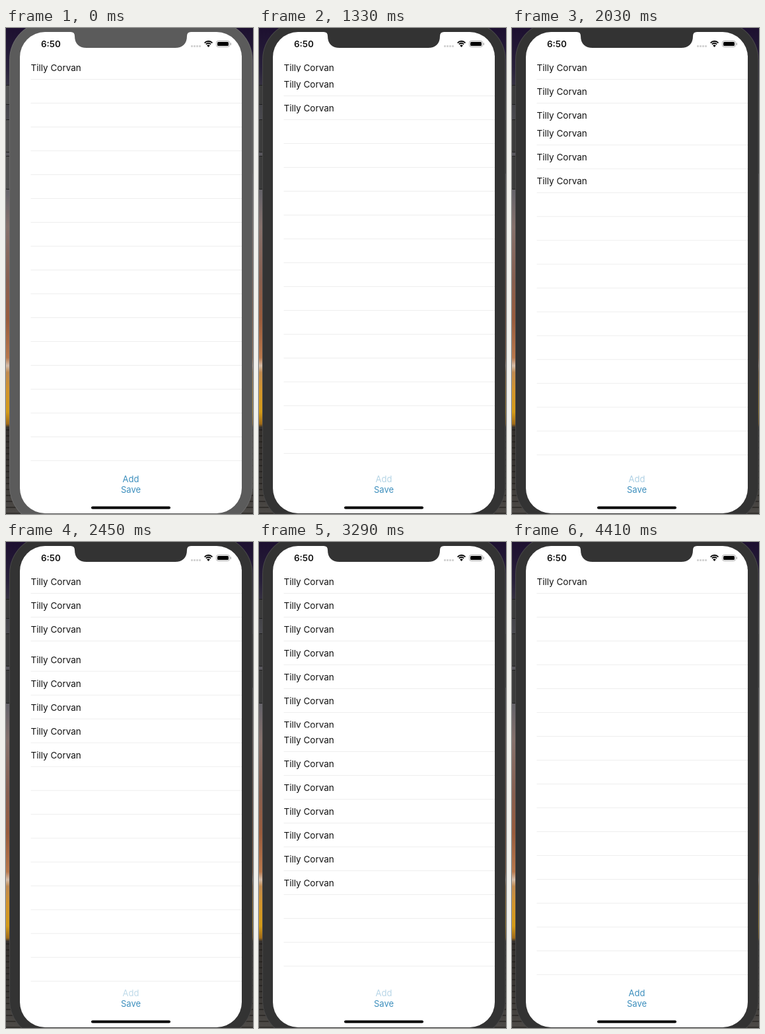
Animation of 374 by 734 pixels, one loop 4.62 s. Source, as an HTML page with a canvas:

```html
<!DOCTYPE html>
<html lang="en">
<head>
<meta charset="utf-8">
<title>List insert animation</title>
<style>
  html, body { margin: 0; width: 100%; height: 100%; overflow: hidden; background: #222; }
  canvas { display: block; width: 374px; height: 734px; }
</style>
</head>
<body>
<canvas id="stage" width="374" height="734"></canvas>
<script>
const ctx = document.getElementById('stage').getContext('2d');
const W = 374, H = 734;
const LOOP = 4620, STEP = 70;
const ROW = 36, TOP = 41.5, LEFT = 37.5, RIGHT = 357, LIST_END = 664;
const NAME = 'Tilly Corvan';
const FONT = 'Inter, Roboto, sans-serif';

// Moments at which a row is inserted
const TAPS = [910, 1229, 1460, 1690, 1921, 2079, 2237, 2395, 2553, 2711, 2872, 3034, 3195, 3356];
const INSERT = 160;
const FOCUS = 560;
const SAVE_DOWN = 3990, SAVE_UP = 4130, REMOVE = 220;

const clamp = v => Math.min(1, Math.max(0, v));
const ease = v => { v = clamp(v); return v * v * (3 - 2 * v); };

function text(str, x, y, size, color, weight = 400, align = 'left') {
  ctx.font = `${weight} ${size}px ${FONT}`;
  ctx.textAlign = align;
  ctx.fillStyle = color;
  ctx.fillText(str, x, y);
}

function box(x, y, w, h, color, r = 0) {
  ctx.fillStyle = color;
  ctx.beginPath();
  ctx.roundRect(x, y, w, h, r);
  ctx.fill();
}

function gradient(stops) {
  const g = ctx.createLinearGradient(0, 0, 0, H);
  for (const [y, color] of stops) g.addColorStop(y / H, color);
  return g;
}

const SKY = gradient([
  [0, '#1d1030'], [60, '#28203a'], [115, '#444449'], [250, '#67646a'], [300, '#85716c'],
  [380, '#875f50'], [440, '#995c3d'], [498, '#b8784c'], [510, '#d5bda8'], [520, '#c08a50'],
  [546, '#d2952d'], [580, '#d39b18'], [598, '#a06b18'], [603, '#34302d'], [680, '#3b3835'],
  [734, '#4d4a47']
]);

function backdrop() {
  box(0, 0, W, H, SKY);
  for (let y = 606; y < H; y += 9) box(0, y, W, 2, 'rgba(20,18,16,.45)');
}

function phone(active) {
  const bezel = active ? '#333333' : '#5b5b5b';
  const key = active ? '#3c3c3c' : '#525252';
  for (const [y, h] of [[86, 30], [138, 50], [193, 51]]) {
    box(0, y, 7, h, '#202020', 1);
    box(0, y + 1, 6, h - 2, key, 1);
  }
  box(371, 139, 3, 81, key);
  box(5, -10, 368.5, 760, active ? '#484848' : '#6a6a6a', 58);
  box(6, -9, 366.5, 758, bezel, 57);
  box(21, 6, 336, 727, '#fff', 38);

  // Notch with flared shoulders
  ctx.fillStyle = bezel;
  ctx.beginPath();
  ctx.moveTo(98, 5);
  ctx.lineTo(98, 6);
  ctx.quadraticCurveTo(104, 6, 104, 12);
  ctx.bezierCurveTo(104, 24, 111, 30, 122, 30);
  ctx.lineTo(256, 30);
  ctx.bezierCurveTo(267, 30, 274, 24, 274, 12);
  ctx.quadraticCurveTo(274, 6, 280, 6);
  ctx.lineTo(280, 5);
  ctx.fill();
}

function statusBar() {
  text('6:50', 53, 29, 13.4, '#111', 600);
  for (let i = 0; i < 4; i++) box(280 + i * 4, 26, 3, 3, '#d2d2d2', 1);

  ctx.strokeStyle = '#000';
  ctx.lineWidth = 1.8;
  for (const r of [5, 8]) {
    ctx.beginPath();
    ctx.arc(306.5, 28, r, -Math.PI * 0.76, -Math.PI * 0.24);
    ctx.stroke();
  }
  ctx.fillStyle = '#000';
  ctx.beginPath();
  ctx.moveTo(306.5, 29);
  ctx.arc(306.5, 28.5, 3, -Math.PI * 0.77, -Math.PI * 0.23);
  ctx.fill();

  ctx.strokeStyle = '#aaa';
  ctx.lineWidth = 1;
  ctx.beginPath();
  ctx.roundRect(318.5, 19.5, 20, 9, 2.8);
  ctx.stroke();
  box(320, 21, 17, 6, '#000', 1.5);
  box(339.6, 22.3, 1.3, 3.6, '#aaa', 0.6);
}

// Opaque run of rows; the first `filled` ones carry a name
function rows(at, count, filled) {
  const y = TOP + at * ROW;
  box(LEFT - 4, y, RIGHT - LEFT + 4, count * ROW, '#fff');
  for (let i = 0; i < count; i++) {
    const top = y + i * ROW;
    box(LEFT, top + 35.5, RIGHT - LEFT, 1, '#eeeeee');
    if (i < filled) text(NAME, LEFT, top + 23.3, 13.5, '#111');
  }
}

function list(t) {
  ctx.save();
  ctx.beginPath();
  ctx.rect(21, TOP, 336, LIST_END - TOP);
  ctx.clip();
  const done = TAPS.filter(tap => tap <= t).length;
  if (t >= SAVE_UP) {
    // The middle row survives and slides to the top
    const total = TAPS.length + 1, keep = total >> 1;
    const p = ease((t - SAVE_UP) / REMOVE);
    rows(0, total, total);
    rows(total - (total - 1) * p, 18, 0);
    rows(keep * (1 - p), 1, 1);
  } else if (!done) {
    rows(0, 18, 1);
  } else {
    const index = (done - 1) >> 1;
    const p = ease((t - TAPS[done - 1]) / INSERT);
    rows(0, index + 1, index + 1);
    rows(index + p, 18, done - index);
  }
  ctx.restore();
}

function addAlpha(t) {
  const low = 0.33;
  let a = 1;
  for (const tap of TAPS) {
    const down = 1 - (1 - low) * clamp((t - tap + 80) / 70);
    const up = low + (1 - low) * clamp((t - tap - 85) / 185);
    a = Math.min(a, Math.max(down, up));
  }
  return a;
}

function saveAlpha(t) {
  const down = 1 - 0.65 * clamp((t - SAVE_DOWN + 10) / 150);
  const up = 0.35 + 0.65 * clamp((t - SAVE_UP - 40) / 220);
  return Math.max(down, up);
}

function button(label, y, alpha) {
  ctx.globalAlpha = alpha;
  text(label, 189, y, 13, '#3d8fbd', 400, 'center');
  ctx.globalAlpha = 1;
}

function draw(t) {
  backdrop();
  phone(t >= FOCUS);
  statusBar();
  list(t);
  button('Add', 686, addAlpha(t));
  button('Save', 702, saveAlpha(t));
  box(129, 722.5, 120, 4, '#000', 2);
}

const start = performance.now();
function tick() {
  const t = (performance.now() - start) % LOOP;
  draw(Math.floor((t + 1) / STEP) * STEP % LOOP);
  requestAnimationFrame(tick);
}
tick();
</script>
</body>
</html>
```
